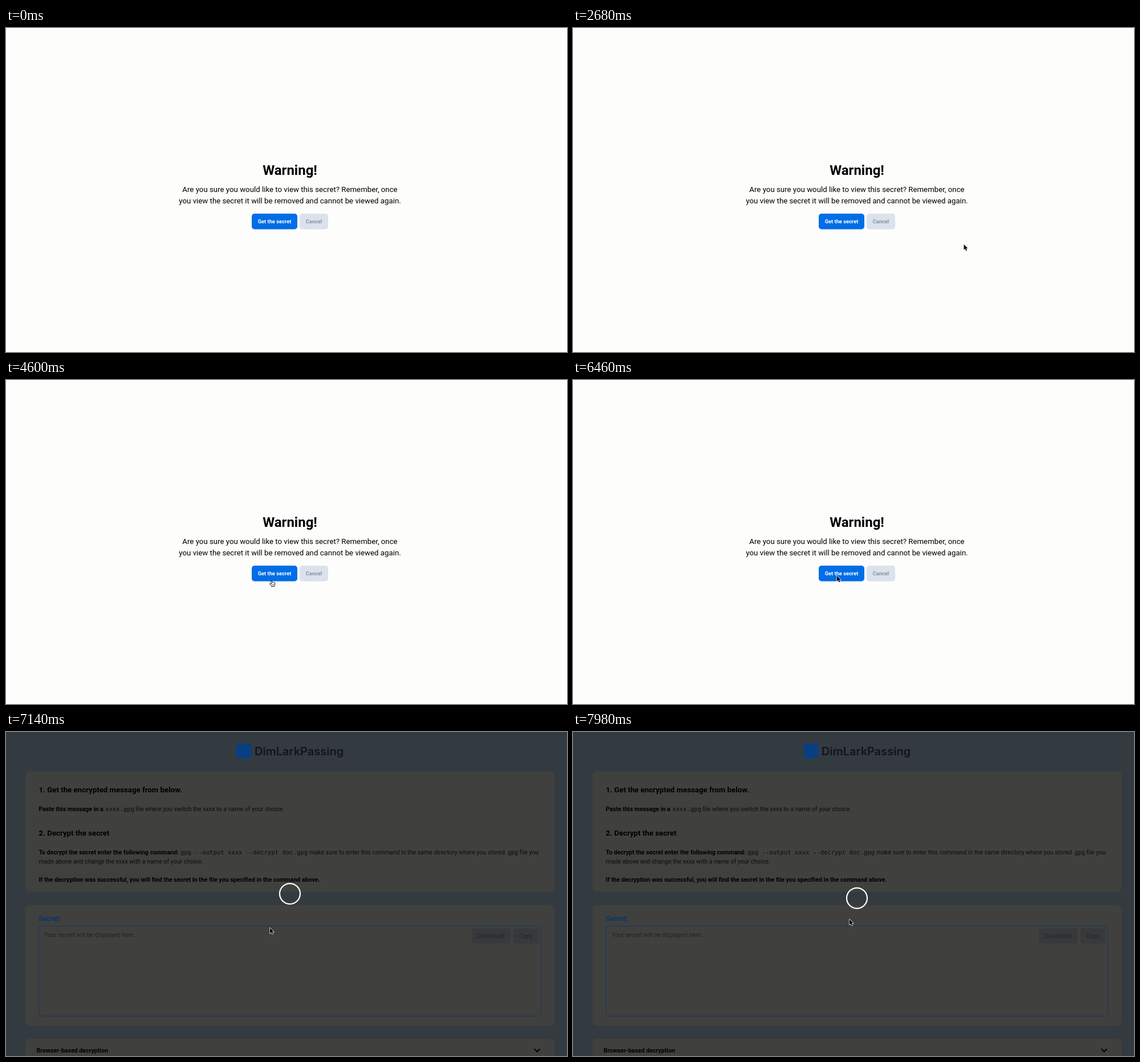
Recreate the animation shown at these times as an HTML page with a canvas. Size 984 by 569 pixels, loop 8000 ms.

```html
<!DOCTYPE html>
<html lang="en">
<head>
<meta charset="utf-8">
<title>View secret</title>
<style>
  html, body { margin: 0; width: 100%; height: 100%; overflow: hidden; background: #fdfdfb; }
  canvas { display: block; }
</style>
</head>
<body>
<canvas id="stage" width="984" height="569"></canvas>
<script>
const W = 984, H = 569, LOOP = 8000;
const REVEAL = 6560;    // the secret page replaces the warning
const PRESS = 6400;     // the hand turns back into an arrow
const ctx = document.getElementById('stage').getContext('2d');
const SANS = 'Roboto, Arial, sans-serif';
const MONO = '"DejaVu Sans Mono", monospace';

// Pointer path: time, x, y of the hot spot
const PATH = [
  [760, 990, 391], [860, 965, 393], [1150, 800, 388], [1540, 697, 381],
  [2500, 697, 381], [2680, 686, 380], [2950, 580, 372], [3240, 490, 367],
  [3340, 482, 365], [3800, 473, 357], [4080, 469, 353], [4600, 466, 352],
  [5100, 466, 350], [5760, 464, 346], [6000, 463, 344], [7540, 463, 344],
  [7980, 485, 329]
];

function text(str, x, y, size, color = '#000', weight = 400, family = SANS, align = 'left') {
  ctx.font = `${weight} ${size}px ${family}`;
  ctx.textAlign = align;
  ctx.fillStyle = color;
  ctx.fillText(str, x, y);
}

function box(x, y, w, h, r, fill, stroke) {
  ctx.beginPath();
  ctx.roundRect(x, y, w, h, r);
  if (fill) { ctx.fillStyle = fill; ctx.fill(); }
  if (stroke) { ctx.strokeStyle = stroke; ctx.lineWidth = 1; ctx.stroke(); }
}

function background(color) {
  ctx.fillStyle = color;
  ctx.fillRect(0, 0, W, H);
}

function drawWarning() {
  background('#fdfdfb');
  const mid = (str, x, y, size, color, weight) => text(str, x, y, size, color, weight, SANS, 'center');
  mid('Warning!', 498, 257.5, 24, '#000', 700);
  mid('Are you sure you would like to view this secret? Remember, once', 498, 288, 13.25);
  mid('you view the secret it will be removed and cannot be viewed again.', 498, 308, 13.25);
  box(431, 326, 80, 27.5, 5, '#006ee6');
  mid('Get the secret', 471, 343, 9.3, '#fff', 700);
  box(515, 326, 50, 27.5, 5, '#dbe2ec');
  mid('Cancel', 540, 343, 9.3, '#8693a6', 700);
}

function drawSecretPage() {
  const size = 10.6, soft = '#0c0c0e';
  const bold = (str, x, y, s = size, color = '#000') => text(str, x, y, s, color, 700);
  const body = (str, x, y) => text(str, x, y, size, soft);
  const code = (str, x, y) => text(str, x, y, size, soft, 400, MONO);

  background('#343b40');
  box(404, 20, 26.5, 26.5, 5, '#093f80');
  text('DimLarkPassing', 436, 40.5, 20, '#14141b', 600, 'Inter, sans-serif');

  const card = '#40403e';
  box(34, 69, 928, 211.5, 8, card);
  box(34, 304, 928, 212, 8, card);
  box(34, 539, 928, 60, 8, card);

  bold('1. Get the encrypted message from below.', 57.5, 106, 13.25);
  bold('Paste this message in a', 57.5, 139);
  code('xxxx.gpg', 174, 139);
  body('file where you switch the xxxx to a name of your choice.', 227.3, 139);
  bold('2. Decrypt the secret', 57.5, 182, 13.25);
  bold('To decrypt the secret enter the following command:', 57.5, 215);
  code('gpg --output xxxx --decrypt doc.gpg', 306, 215);
  body('make sure to enter this command in the same directory where you stored .gpg file you', 532.3, 215);
  body('made above and change the xxxx with a name of your choice.', 57.5, 231);
  bold('If the decryption was successful, you will find the secret in the file you specified in the command above.', 57.5, 263);

  bold('Secret:', 57.5, 331.5, 12, '#06366f');
  box(58, 340.5, 880, 158.5, 4, null, '#17395c');
  text('Your secret will be displayed here.', 67.5, 359.5, size, '#222324');
  box(817.5, 345, 67.5, 26.5, 4, '#37393b');
  text('Download', 826.7, 361.5, size, '#222529');
  box(890, 345, 44.5, 26.5, 4, '#37393b');
  text('Copy', 899.8, 361.5, size, '#222529');

  bold('Browser-based decryption', 53.5, 563.3);
  ctx.beginPath();
  ctx.moveTo(927, 556.5);
  ctx.lineTo(931.7, 561.5);
  ctx.lineTo(936.4, 556.5);
  ctx.strokeStyle = '#000';
  ctx.lineWidth = 2;
  ctx.stroke();
}

function drawLoader(elapsed) {
  ctx.beginPath();
  ctx.arc(498, 282.5 + 9.3 * (elapsed / 1420) ** 2, 18, 0, Math.PI * 2);
  ctx.strokeStyle = '#fff';
  ctx.lineWidth = 2.2;
  ctx.stroke();
}

function pointerAt(t) {
  const i = PATH.findIndex(p => p[0] > t);
  if (i === 0) return null;
  if (i < 0) return PATH[PATH.length - 1].slice(1);
  const [t0, x0, y0] = PATH[i - 1], [t1, x1, y1] = PATH[i];
  const k = (t - t0) / (t1 - t0);
  return [x0 + (x1 - x0) * k, y0 + (y1 - y0) * k];
}

function drawArrow(x, y) {
  const shape = new Path2D('M0 0V9.6L2.2 7.6L3.8 11.2L5.4 10.5L3.9 7H6.8Z');
  ctx.save();
  ctx.translate(x, y);
  ctx.lineJoin = 'round';
  ctx.lineWidth = 1.3;
  ctx.strokeStyle = '#fff';
  ctx.stroke(shape);
  ctx.fillStyle = '#000';
  ctx.fill(shape);
  ctx.restore();
}

function drawHand(x, y) {
  const shape = new Path2D('M-1.6 .9Q-.8 -.4 .1 .9L1.1 3.7Q2 2.8 2.8 3.6Q3.7 2.9 4.4 3.8Q5.8 3.6 5.9 5.2Q6.2 8 4.8 9.2V10.7H-.4V9.6L-3.2 6.5Q-3.5 5.2 -2.2 5.4L-.5 6.4Z');
  ctx.save();
  ctx.translate(x, y);
  ctx.lineJoin = 'round';
  ctx.fillStyle = '#fff';
  ctx.fill(shape);
  ctx.lineWidth = 0.9;
  ctx.strokeStyle = '#000';
  ctx.stroke(shape);
  ctx.beginPath();
  for (const dx of [1.2, 2.7, 4.1]) {
    ctx.moveTo(dx, 6.4);
    ctx.lineTo(dx, 8.8);
  }
  ctx.lineWidth = 0.5;
  ctx.stroke();
  ctx.restore();
}

function render(t) {
  if (t < REVEAL) {
    drawWarning();
  } else {
    drawSecretPage();
    drawLoader(t - REVEAL);
  }
  const spot = pointerAt(t);
  if (!spot) return;
  const overButton = spot[0] > 431 && spot[0] < 511 && spot[1] < 354;
  (overButton && t < PRESS ? drawHand : drawArrow)(...spot);
}

const start = performance.now();
function tick() {
  render((performance.now() - start) % LOOP);
  requestAnimationFrame(tick);
}
tick();
</script>
</body>
</html>
```
